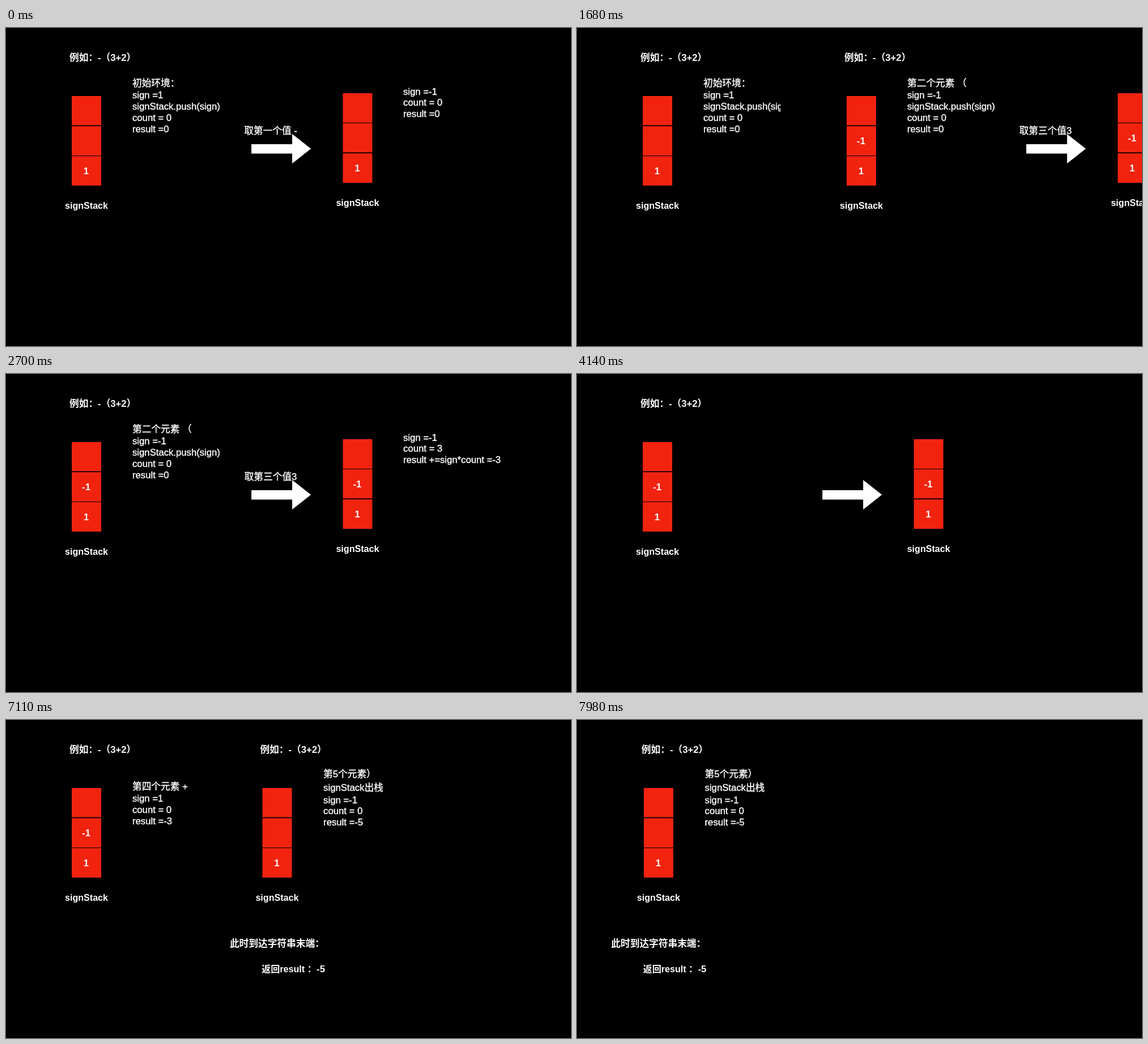
Recreate the animation shown at these times as an HTML page. Size 997 by 561 pixels, loop 8 s.

```html
<!DOCTYPE html>
<html lang="zh-CN">
<head>
<meta charset="utf-8">
<style>
  html, body { margin: 0; width: 100%; height: 100%; overflow: hidden; background: #000; }
  svg { display: block; width: 997px; height: 561px; }
  text {
    font: 16.7px "Liberation Sans", "Noto Sans CJK SC", "Noto Sans CJK", sans-serif;
    fill: #fff; stroke: #fff; stroke-width: .4px;
  }
  .bold { font-weight: bold; stroke: none; }
  .label { font-size: 16.1px; }
  .mid { text-anchor: middle; }
</style>
</head>
<body>
<svg id="stage" viewBox="0 0 997 561"></svg>
<script>
const LOOP = 8000, STEP = 30, WIDTH = 997, LINE = 19.75;

const text = (x, y, str, cls = '') => `<text x="${x}" y="${y}" class="${cls}">${str}</text>`;

const lines = (x, y, list) => list.map((s, i) => text(x, y + i * LINE, s)).join('');

// Three cells, given as [top, height], with values listed from the top down.
function stack(x, cells, values) {
  const boxes = cells.map(([y, h], i) =>
    `<rect x="${x}" y="${y}" width="52" height="${h}" fill="#f1230f"/>` +
    text(x + 25.5, cells[0][0] + 32.2 + i * 53, values[i], 'bold mid'));
  return boxes.join('') + text(x + 26, cells[0][0] + 199, 'signStack', 'bold label mid');
}

const leftStack = (...values) => stack(116, [[120, 51.5], [173.2, 51.8], [226, 52]], values);
const rightStack = (...values) => stack(594.4, [[115, 52], [168, 51.4], [221.2, 52]], values);

const title = text(112, 58, '例如：-（3+2）', 'bold');
const arrow = '<path d="M433 205H505V187L538 213L505 239V221.5H433Z" fill="#fff"/>';
const caption = str => text(467, 187, str, 'mid');

const slide = (id, body) =>
  `<g id="${id}"><rect width="${WIDTH}" height="561"/>${title}${body}</g>`;

const L = 223, R = 701;

stage.innerHTML =
  slide('first',
    leftStack('', '', '1') + rightStack('', '', '1') + arrow +
    text(L, 103, '初始环境：') +
    lines(L, 124.3, ['sign =1', 'signStack.push(sign)', 'count = 0', 'result =0']) +
    caption('取第一个值 -') +
    lines(R, 117.6, ['sign =-1', 'count = 0', 'result =0'])) +
  slide('second',
    leftStack('', '-1', '1') + rightStack('', '-1', '1') + arrow +
    '<g id="before">' +
    text(L, 103, '第二个元素 （') +
    lines(L, 124.3, ['sign =-1', 'signStack.push(sign)', 'count = 0', 'result =0']) +
    caption('取第三个值3') +
    lines(R, 117.6, ['sign =-1', 'count = 3', 'result +=sign*count =-3']) +
    '</g><g id="after">' +
    text(L, 123, '第四个元素 +') +
    lines(L, 144.3, ['sign =1', 'count = 0', 'result =-3']) +
    caption('取第五个元素2') +
    lines(R, 108, ['sign =-1', 'count = 2', 'result +=sign*count =-5', 'count = 0']) +
    '</g>') +
  slide('third',
    leftStack('', '', '1') +
    text(L + 0.7, 101, '第5个元素）') +
    text(L + 0.7, 124.5, 'signStack出栈') +
    lines(L + 0.7, 146.5, ['sign =-1', 'count = 0', 'result =-5']) +
    text(58.5, 400, '此时到达字符串末端：', 'bold') +
    text(114.7, 445, '返回result', 'bold label') +
    text(195, 445, '：-5', 'bold'));

const el = id => document.getElementById(id);
const ramp = (t, from, to) => Math.min(1, Math.max(0, (t - from) / (to - from)));

// Distance from the resting place for a slide entering from the right:
// a cosine ease with a quick start and a long soft landing.
function offset(t, start) {
  const x = ramp(t, start, start + 1975);
  const p = x + x * (1 - x) * (0.437 + 0.28 * x ** 3);
  return WIDTH * (1 + Math.cos(Math.PI * p)) / 2;
}

const place = (id, x) => el(id).setAttribute('transform', `translate(${x.toFixed(2)})`);

function draw(now) {
  const t = Math.floor(now % LOOP / STEP) * STEP;
  place('second', offset(t, 745));
  place('third', offset(t, 6146));
  el('before').setAttribute('opacity', 1 - ramp(t, 3660, 4140));
  el('after').setAttribute('opacity', ramp(t, 4890, 5340));
}

const begin = performance.now();
function tick() {
  draw(performance.now() - begin);
  requestAnimationFrame(tick);
}
tick();
</script>
</body>
</html>
```
